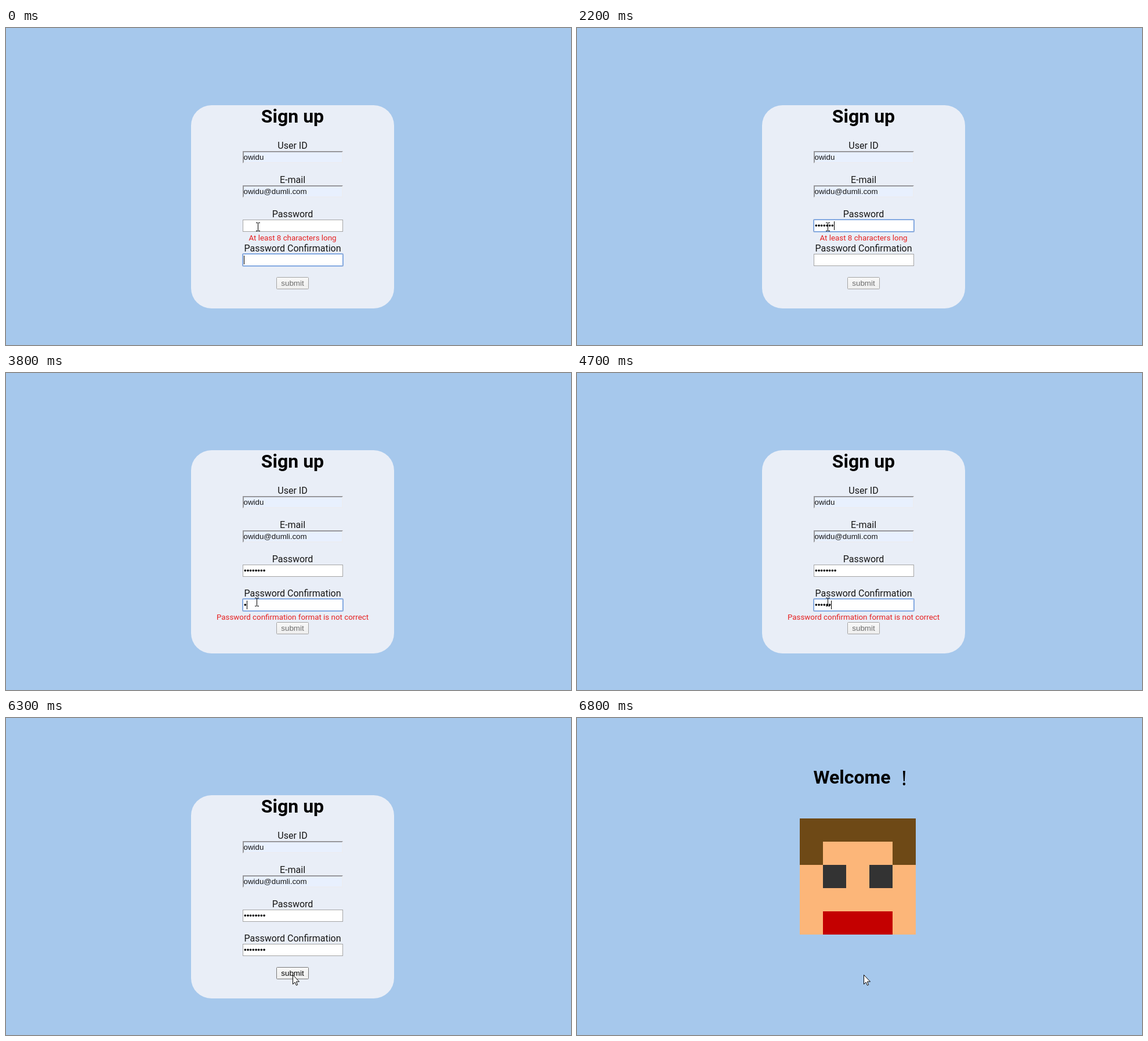
An HTML page with a canvas for the animation above (8.2 s loop, 974 by 546 pixels).

```html
<!DOCTYPE html>
<html lang="en">
<head>
<meta charset="utf-8">
<title>Sign up form</title>
<style>
  html, body { margin: 0; width: 100%; height: 100%; overflow: hidden; background: #a6c8ec; }
  canvas { display: block; }
</style>
</head>
<body>
<canvas id="stage" width="974" height="546"></canvas>
<script>
const ctx = document.getElementById('stage').getContext('2d');
const LOOP = 8200, STEP = 100, CENTER = 494;
const LABEL = '16px Roboto, sans-serif';
const SMALL = '13.333px Roboto, sans-serif';
const CONTROL = '13.333px "Liberation Sans", Arial, sans-serif';
const HEADING = 'bold 32px Roboto, sans-serif';
const INK = '#161616', ERROR = '#e62020';
const BULLET = 4.667;

// Times at which each bullet is typed
const passwordKeys = [1200, 1500, 1700, 1700, 1800, 2000, 2200, 2600];
const confirmKeys = [3800, 4000, 4200, 4300, 4500, 4700, 4900, 5100];
const FOCUS_PASSWORD = 200, FOCUS_CONFIRM = 3500, CLICK = 6100, WELCOME = 6400;

// Pointer waypoints: time, x, y
const pointerPath = [
  [0, 434, 342], [100, 434, 342], [400, 432, 342], [2700, 432, 342], [3300, 432, 394],
  [5200, 432, 394], [5500, 475, 421], [5800, 495, 442], [LOOP, 495, 442]
];

function rect(x, y, w, h, color) {
  ctx.fillStyle = color;
  ctx.fillRect(x, y, w, h);
}

function text(str, x, y, font, color = '#000', align = 'center') {
  ctx.font = font;
  ctx.fillStyle = color;
  ctx.textAlign = align;
  ctx.fillText(str, x, y);
}

function polygon(points, color) {
  ctx.beginPath();
  points.forEach(([x, y]) => ctx.lineTo(x, y));
  ctx.closePath();
  ctx.fillStyle = color;
  ctx.fill();
}

function roundRect(x, y, w, h, r) {
  ctx.beginPath();
  ctx.roundRect(x, y, w, h, r);
}

function outline(x, y, w, h, color) {
  roundRect(x + 0.5, y + 0.5, w - 1, h - 1, 1);
  ctx.lineWidth = 1;
  ctx.strokeStyle = color;
  ctx.stroke();
}

function filledField(label, value, y) {
  text(label, CENTER, y - 4, LABEL, INK);
  rect(408, y, 173, 21, '#ebedf3');
  rect(410, y + 2, 169, 17, '#e8f0fe');
  polygon([[408, y], [581, y], [579, y + 2], [410, y + 2], [410, y + 19], [408, y + 21]], '#97979b');
  text(value, 409.5, y + 15, CONTROL, INK, 'left');
}

function passwordField(label, y, t, keys, focusedAt) {
  text(label, CENTER, y - 4, LABEL, INK);
  rect(408, y, 173, 21, '#a5a5a5');
  rect(409, y + 1, 171, 19, '#fff');
  const typed = keys.filter(k => k <= t);
  text('•'.repeat(typed.length), 410, y + 15, CONTROL, '#000', 'left');
  if (focusedAt === null) return;
  outline(407, y - 1, 175, 23, '#92b4e6');
  outline(408, y, 173, 21, '#749edd');
  const blinkStart = Math.max(focusedAt, ...typed);
  if ((t - blinkStart) % 1000 < 500) {
    rect(Math.round(410 + BULLET * typed.length), y + 3, 1, 15, '#000');
  }
}

function submitButton(enabled, hovered) {
  const fill = ctx.createLinearGradient(0, 429, 0, 450);
  fill.addColorStop(0, '#f8f8f8');
  fill.addColorStop(1, '#eeeeee');
  rect(466, 429, 56, 21, fill);
  outline(466, 429, 56, 21, hovered ? '#787878' : '#a4a4a4');
  text('submit', CENTER, 444, CONTROL, enabled ? '#000' : '#6d6d6d');
}

function drawForm(t) {
  roundRect(319, 133, 350, 350, 35);
  ctx.fillStyle = '#e9eef7';
  ctx.fill();
  text('Sign up', CENTER, 163, HEADING);
  filledField('User ID', 'owidu', 212);
  filledField('E-mail', 'owidu@dumli.com', 271);

  const onPassword = t >= FOCUS_PASSWORD && t < FOCUS_CONFIRM;
  const onConfirm = !onPassword && t < CLICK;
  passwordField('Password', 330, t, passwordKeys, onPassword ? FOCUS_PASSWORD : null);
  passwordField('Password Confirmation', 389, t, confirmKeys,
    onConfirm ? (t < FOCUS_PASSWORD ? 0 : FOCUS_CONFIRM) : null);

  const complete = t >= confirmKeys[7];
  if (t < passwordKeys[7]) text('At least 8 characters long', CENTER, 366, SMALL, ERROR);
  if (t >= confirmKeys[0] && !complete) {
    text('Password confirmation format is not correct', CENTER, 425, SMALL, ERROR);
  }
  submitButton(complete, pointerAt(t)[1] >= 429);
}

function drawWelcome() {
  text('Welcome', 407.5, 113, HEADING, '#000', 'left');
  text('!', 564, 116, '34px "Noto Serif", serif');
  rect(384, 173, 200, 200, '#fcb679');
  rect(384, 173, 200, 40, '#6e4916');
  rect(384, 213, 40, 40, '#6e4916');
  rect(544, 213, 40, 40, '#6e4916');
  rect(424, 253, 40, 40, '#333');
  rect(504, 253, 40, 40, '#333');
  rect(424, 333, 120, 40, '#c40000');
}

function pointerAt(t) {
  const i = pointerPath.findIndex(p => p[0] > t);
  const [t0, x0, y0] = pointerPath[i - 1], [t1, x1, y1] = pointerPath[i];
  const k = (t - t0) / (t1 - t0);
  return [Math.round(x0 + (x1 - x0) * k), Math.round(y0 + (y1 - y0) * k)];
}

function drawPointer(t) {
  const [x, y] = pointerAt(t);
  const overText = y <= 351 || (y >= 371 && y <= 410);
  if (overText) {
    rect(x, y - 6, 1, 13, '#000');
    for (const edge of [y - 7, y + 7]) {
      rect(x - 3, edge, 3, 1, '#000');
      rect(x + 1, edge, 3, 1, '#000');
    }
    return;
  }
  const arrow = [[0, 0], [0, 16], [3.6, 12.6], [6, 18], [8.2, 17], [5.9, 11.6], [11, 11.6]];
  polygon(arrow.map(([dx, dy]) => [x - 0.5 + dx, y + 0.5 + dy]), '#fff');
  ctx.strokeStyle = '#000';
  ctx.lineWidth = 1;
  ctx.stroke();
}

function frame() {
  const t = Math.floor(performance.now() % LOOP / STEP) * STEP;
  rect(0, 0, 974, 546, '#a6c8ec');
  if (t < WELCOME) drawForm(t);
  else drawWelcome();
  drawPointer(t);
  requestAnimationFrame(frame);
}
frame();
</script>
</body>
</html>
```
